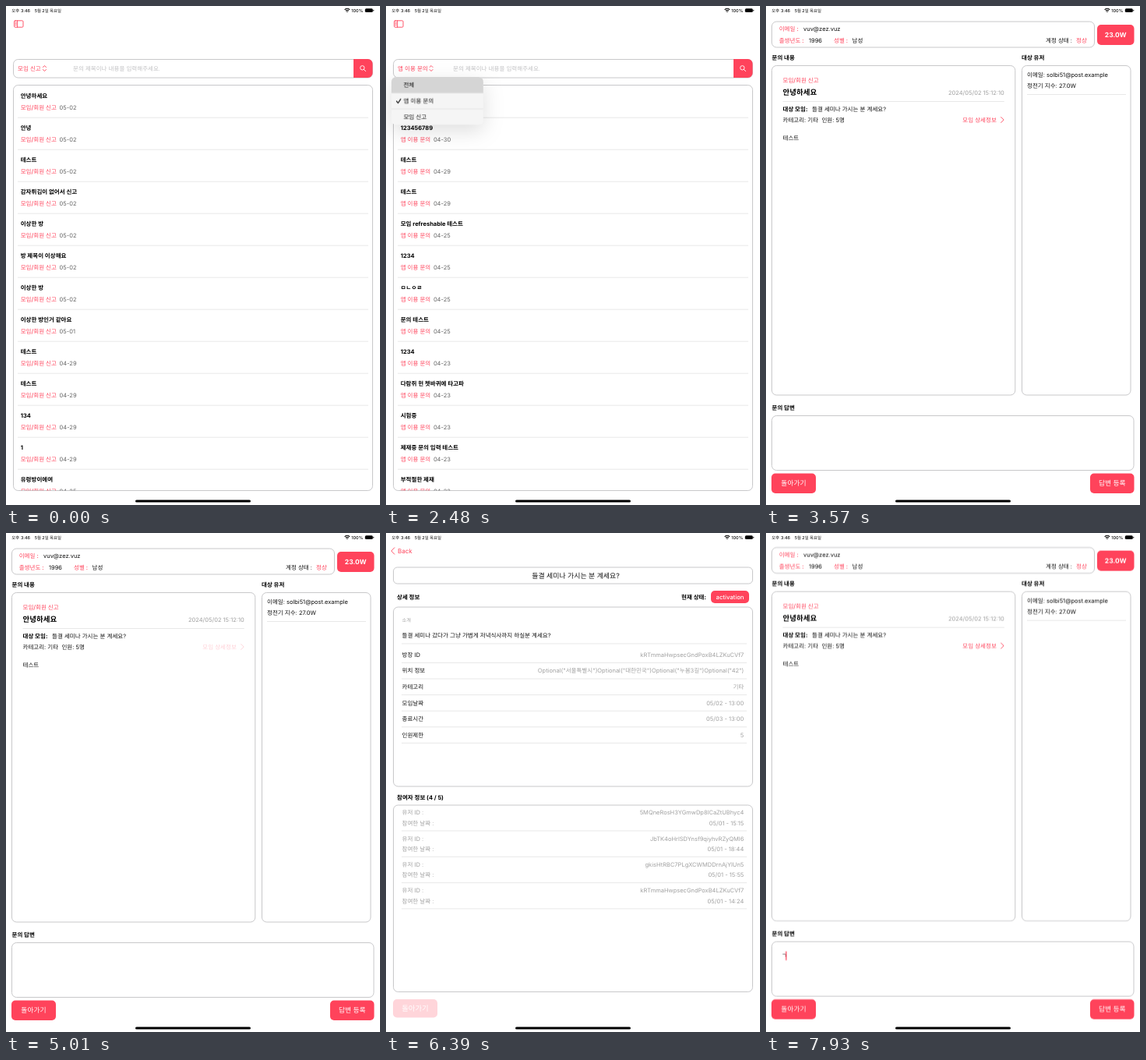
Animation, 480 px wide and 640 px high, one loop 8000 ms. Source, as an HTML page:

```html
<!DOCTYPE html>
<html lang="ko">
<head>
<meta charset="utf-8">
<title>문의 관리</title>
<style>
  html, body { margin: 0; width: 100%; height: 100%; overflow: hidden; background: #fff; }
  svg { display: block; width: 480px; height: 640px; }
  text { font-family: Inter, 'Noto Sans CJK KR', 'Noto Sans CJK', sans-serif; fill: #111; white-space: pre; text-rendering: geometricPrecision; }
  .m { font-weight: 500; }
  .b { font-weight: 700; fill: #000; }
  .d { fill: #666; font-weight: 400; }
  .g { fill: #a0a0a0; }
  .p { fill: #c2c2c4; }
  .r { fill: #ff435b; }
  .w { fill: #fff; }
  .e { text-anchor: end; }
  .c { text-anchor: middle; }
  .box { fill: #fff; stroke: #c2c2c4; stroke-width: .9; }
  .rule { stroke: #dedede; stroke-width: .7; }
  .icon { fill: none; stroke: #ff435b; stroke-width: .9; stroke-linecap: round; stroke-linejoin: round; }
  .dark { stroke: #000; stroke-width: 1.1; }
  #menu { transform-origin: 30px 92px; filter: drop-shadow(0 8px 13px rgba(0, 0, 0, .13)); }
</style>
</head>
<body>
<svg id="stage" viewBox="0 0 480 640"></svg>
<script>
const LOOP = 8000;
const SIZE = 7.5;
const $ = id => document.getElementById(id);

const text = (x, y, str, cls = '', size = SIZE) =>
  `<text x="${x}" y="${y + size * .36}" class="${cls}" font-size="${size}">${str}</text>`;
const box = (x, y, right, bottom, r = 6) =>
  `<rect class="box" x="${x + .5}" y="${y + .5}" width="${right - x - 1}" height="${bottom - y - 1}" rx="${r}"/>`;
const fill = (x, y, right, bottom, cls, r = 0) =>
  `<rect class="${cls}" x="${x}" y="${y}" width="${right - x}" height="${bottom - y}" rx="${r}"/>`;
const rule = (x, right, y) => `<path class="rule" d="M${x} ${y}H${right}"/>`;
const icon = (d, cls = '') => `<path class="icon ${cls}" d="${d}"/>`;
const group = (id, body, attrs = '') => `<g id="${id}" ${attrs}>${body}</g>`;
const button = (x, y, right, bottom, label, cls, size) =>
  fill(x, y, right, bottom, 'r', 5) + text((x + right) / 2, (y + bottom) / 2, label, 'w c ' + cls, size);

const REPORT = '모임/회원 신고', APP = '앱 이용 문의';
const reports = [
  ['안녕하세요', '05-02'], ['안녕', '05-02'], ['테스트', '05-02'], ['감자튀김이 없어서 신고', '05-02'],
  ['이상한 방', '05-02'], ['방 제목이 이상해요', '05-02'], ['이상한 방', '05-02'], ['이상한 방인거 같아요', '05-01'],
  ['테스트', '04-29'], ['테스트', '04-29'], ['134', '04-29'], ['1', '04-29'], ['유령방이에여', '04-25']
].map(row => [...row, REPORT]);
const inquiries = [
  ['제재 중 문의하기', '05-01'], ['123456789', '04-30'], ['테스트', '04-29'], ['테스트', '04-29'],
  ['모임 refreshable 테스트', '04-25'], ['1234', '04-25'], ['ㅁㄴㅇㄹ', '04-25'], ['문의 테스트', '04-25'],
  ['1234', '04-23'], ['다람쥐 헌 쳇바퀴에 타고파', '04-23'], ['시험중', '04-23'],
  ['제재중 문의 입력 테스트', '04-23'], ['부적절한 제재', '04-23']
].map(row => [...row, APP]);
const everything = [...reports.slice(0, 8), ...inquiries.slice(0, 2), ...reports.slice(8, 11)];

const listRow = ([title, date, kind], i) => {
  const y = 115.5 + 41 * i;
  return `<g>${text(18.7, y, title, 'b')}${text(18.7, y + 14.6,
    `${kind}<tspan class="d" dx="3.7">${date}</tspan>`, 'r m')}</g>${rule(15, 465, y + 27.7)}`;
};
const view = (id, label, chevronX, rows) => group(id,
  text(15, 80, label, 'r') +
  icon(`M${chevronX - 2} 78.5l2 -2 2 2M${chevronX - 2} 81.5l2 2 2 -2`) +
  `<g clip-path="url(#listClip)">${rows.map(listRow).join('')}</g>`);

const listPage =
  icon('M11.8 18.8h9a1.2 1.2 0 0 1 1.2 1.2v6a1.2 1.2 0 0 1 -1.2 1.2h-9a1.2 1.2 0 0 1 -1.2 -1.2v-6a1.2 1.2 0 0 1 1.2 -1.2zM14.6 18.8v8.4M12.1 21h1M12.1 22.7h1M12.1 24.4h1') +
  box(9, 68, 471, 92.5) +
  '<path class="r" d="M446 68h18.500a6 6 0 0 1 6 6v12a6 6 0 0 1 -6 6h-18.500z"/>' +
  '<circle cx="457.300" cy="79.300" r="2.700" fill="none" stroke="#fff" stroke-width=".9"/><path d="M459.300 81.300l2.500 2.500" stroke="#fff"/>' +
  text(86, 80, '문의 제목이나 내용을 입력해주세요.', 'p') +
  box(9, 101, 471, 622) +
  view('viewReports', '모임 신고', 49.5, reports) +
  view('viewInquiries', APP, 58, inquiries) +
  view('viewAll', '전체', 33.3, everything);

const menu = group('menu',
  '<g clip-path="url(#menuClip)">' +
  fill(7, 91, 125, 152.500, 'menuFill').replace('/>', ' fill="#f5f5f5"/>') +
  group('press', '<rect x="7" y="91" width="118" height="20.500" fill="#d5d5d5"/>') +
  '<path d="M7 111.500h118M7 132h118" stroke="#ddd" stroke-width=".6"/>' +
  text(22.5, 101.3, '전체') + text(22.5, 121.8, APP) + text(22.5, 142.3, '모임 신고') +
  group('check', icon('M13.5 142.600l2 2.300 3.300 -5', 'dark')) + '</g>');

const MEETING = '들결 세미나 가시는 분 계세요?';
const inquiryHead = right =>
  box(7, 76, right + 14.5, 499.5) + text(right, 111.3, '2024/05/02 15:12:10', 'g e') + rule(21.5, right, 122.5);
const detailPage =
  fill(0, 0, 480, 645, 'w') +
  box(7, 19.5, 422, 53.5) +
  text(16.7, 29.7, '이메일 :', 'r m') + text(48, 29.7, 'vuv@zez.vuz') +
  text(16.7, 44, '출생년도 :', 'r m') + text(55, 44, '1996') +
  text(87, 44, '성별 :', 'r m') + text(110.5, 44, '남성') +
  text(359, 44, '계정 상태 :') + text(398, 44, '정상', 'r m') +
  button(425, 24, 472.5, 50, '23.0W', 'b', 8.5).replace('w c b"', 'c b" style="fill:#fff"') +
  text(7.5, 66.5, '문의 내용', 'b') +
  group('loading', inquiryHead(458) + text(21.5, 146, '카테고리:   인원: 0명')) +
  group('loaded',
    inquiryHead(305.8) + text(59, 131.8, MEETING) + text(21.5, 146, '카테고리: 기타  인원: 5명') +
    group('more', text(252.3, 146, '모임 상세정보', 'r') + icon('M301.700 142.500l3.500 3.500 -3.500 3.500')) +
    text(328, 66.5, '대상 유저', 'b') + box(328, 76, 468.5, 499.5) +
    text(335, 88, '이메일: solbi51@post.example') + text(335, 102.3, '정전기 지수: 27.0W') + rule(335, 462, 113.5)) +
  text(21.5, 95.5, REPORT, 'r m') + text(21.5, 111, '안녕하세요', 'b', 9.5) +
  text(21.5, 131.8, '대상 모임:', 'b') + text(21.5, 169.7, '테스트') +
  text(7.5, 515.3, '문의 답변', 'b') + box(7, 525, 472.5, 596) +
  group('typed', text(20, 543.4, 'ㄱ')) +
  group('caret', '<rect x="18.500" y="537.900" width="1.300" height="11.500" class="r"/>') +
  button(7, 599.5, 64, 625, '돌아가기', 'm', 8.8) + button(416, 599.5, 472.5, 625, '답변 등록', 'm', 8.8);

const facts = [
  ['방장 ID', 'kRTmmaHwpsecGndPoxB4LZKuCVf7'],
  ['위치 정보', 'Optional("서울특별시")Optional("대한민국")Optional("누봄3길")Optional("42")'],
  ['카테고리', '기타'], ['모임날짜', '05/02 - 13:00'], ['종료시간', '05/03 - 13:00'], ['인원제한', '5']
];
const members = [
  ['5MQneRosH3YGmwDp8lCaZtUBhyc4', '15:15'], ['JbTK4oHrlSDYnsf9qiyhvRZyQMl6', '18:44'],
  ['gkisHtRBC7PLgXCWMDDrnAjYlUn5', '15:55'], ['kRTmmaHwpsecGndPoxB4LZKuCVf7', '14:24']
];
const meetingPage =
  fill(0, 0, 480, 640, 'w') +
  box(9, 43.5, 471, 65.5, 5) + text(243.5, 54.5, MEETING, 'c', 8.9) +
  text(14, 82, '상세 정보', 'b') + text(411, 82, '현재 상태:', 'b e') +
  button(417, 74, 466, 90, 'activation', 'm', 7.7) +
  box(9, 94.5, 471, 325.5) +
  text(20.5, 111.3, '소개', 'g', 6.2) +
  text(20.5, 131.5, '들결 세미나 갔다가 그냥 가볍게 저녁식사까지 하실분 계세요?') + rule(20, 463, 142) +
  facts.map(([label, value], i) => {
    const y = 156 + 20.6 * i;
    return text(20.5, y, label) + text(459.3, y, value, 'g e') + rule(20, 463, y + 10.4);
  }).join('') +
  text(14, 339, '참여자 정보 (4 / 5)', 'b') + box(9, 348.5, 471, 589) +
  members.map(([id, time], i) => {
    const y = 358.7 + 33.3 * i;
    return text(20.5, y, '유저 ID :', 'g') + text(459.3, y, id, 'g e') +
      text(20.5, y + 13.4, '참여한 날짜 :', 'g') + text(459.3, y + 13.4, '05/01 - ' + time, 'g e') +
      rule(20, 463, y + 23.3);
  }).join('') +
  group('goBack', button(9, 598, 66, 621.5, '돌아가기', 'm', 9.4));

const statusBar =
  text(7.3, 5.6, '오후 3:46', 'm', 5.5) + text(36.7, 5.6, '5월 2일 목요일', 'm', 5.4) +
  text(458.3, 5.6, '100%', 'm e', 5.6) +
  icon('M435 4.500q2.900 -2.600 5.800 0M436.300 5.900q1.600 -1.400 3.200 0', 'dark') + '<circle cx="437.900" cy="7.300" r=".8"/>' +
  '<rect x="460.800" y="3.300" width="10" height="4.800" rx="1.500"/><rect x="471.300" y="4.800" width=".8" height="1.800" rx=".4"/>';

$('stage').innerHTML =
  `<defs><clipPath id="listClip"><rect x="9" y="101" width="462" height="520.500" rx="6"/></clipPath>
   <clipPath id="menuClip"><rect x="7" y="91" width="118" height="61.500" rx="6"/></clipPath></defs>` +
  listPage + menu + group('detail', detailPage) +
  group('dim', '<rect width="480" height="640"/>') + group('meeting', meetingPage) +
  group('nav', icon('M10.800 18.800l-4 4.200 4 4.200') + text(15, 23, 'Back', 'r', 8)) +
  statusBar + '<rect x="166" y="633.500" width="148" height="3" rx="1.500"/>';

// Each step holds its value until the next one.
const play = (id, prop, steps, target = $(id)) => target.animate(
  [...steps, [LOOP, steps.at(-1)[1]]].map(([ms, value]) =>
    ({ offset: ms / LOOP, [prop]: value, easing: 'step-end' })),
  { duration: LOOP, iterations: Infinity });
const show = (id, from, to = LOOP) => play(id, 'opacity',
  [...(from ? [[0, 0]] : []), [from, 1], ...(to < LOOP ? [[to, 0]] : [])]);
const move = (id, steps) => play(id, 'transform',
  steps.map(([ms, x, y = 0]) => [ms, `translate(${x}px, ${y}px)`]));

show('viewReports', 0, 1590);
show('viewInquiries', 1590, 2590);
show('viewAll', 2590);

play('menu', 'opacity', [[0, 0], [590, .35], [700, .8], [810, 1], [1700, .65], [1810, .25], [1920, 0],
  [2040, .35], [2150, .8], [2260, 1], [2590, .8], [2700, .3], [2810, 0]]);
play('menu', 'transform', [[0, .4], [590, .5], [700, .85], [810, 1.02], [920, 1], [1700, .85], [1810, .5],
  [2040, .5], [2150, .85], [2260, 1.02], [2370, 1], [2590, .9], [2700, .55]]
  .map(([ms, scale]) => [ms, `scale(${scale})`]));
play('press', 'opacity', [[0, 0], [1270, 1], [1920, 0], [2480, 1]]);
move('press', [[0, 0, 20.5], [1920, 0, 0]]);
move('check', [[0, 0, 0], [1920, 0, -20.5]]);

play('', 'opacity', [[0, 1], [3030, .25], [3360, 1]], document.querySelector('#viewAll g g'));

const SHIFT = -1.4;
const push = [[0, 480], [5120, 320], [5240, 130.5], [5350, 42], [5450, 9], [5540, 0],
  [6500, 150], [6610, 350], [6720, 440], [6830, 472], [6940, 480]];
move('meeting', push);
move('detail', [[0, 0, 645], [3140, 0, 470], [3250, 0, 210], [3360, 0, 70], [3470, 0, 14], [3570, 0, 0],
  ...push.slice(1).map(([ms, x]) => [ms, (x - 480) * .3, SHIFT])]);
play('dim', 'opacity', push.map(([ms, x]) => [ms, (480 - x) / 480 * .11]));
play('nav', 'opacity', [[0, 0], [5120, .5], [5240, 1], [6500, .6], [6610, .2], [6720, 0]]);
show('loading', 0, 3470);
show('loaded', 3470);
play('more', 'opacity', [[0, 1], [5010, .25], [5240, 1]]);
play('goBack', 'opacity', [[0, 1], [6390, .22], [6610, 1]]);

show('caret', 7240);
move('caret', [[0, 0], [7930, 6.7]]);
show('typed', 7930);
</script>
</body>
</html>
```
